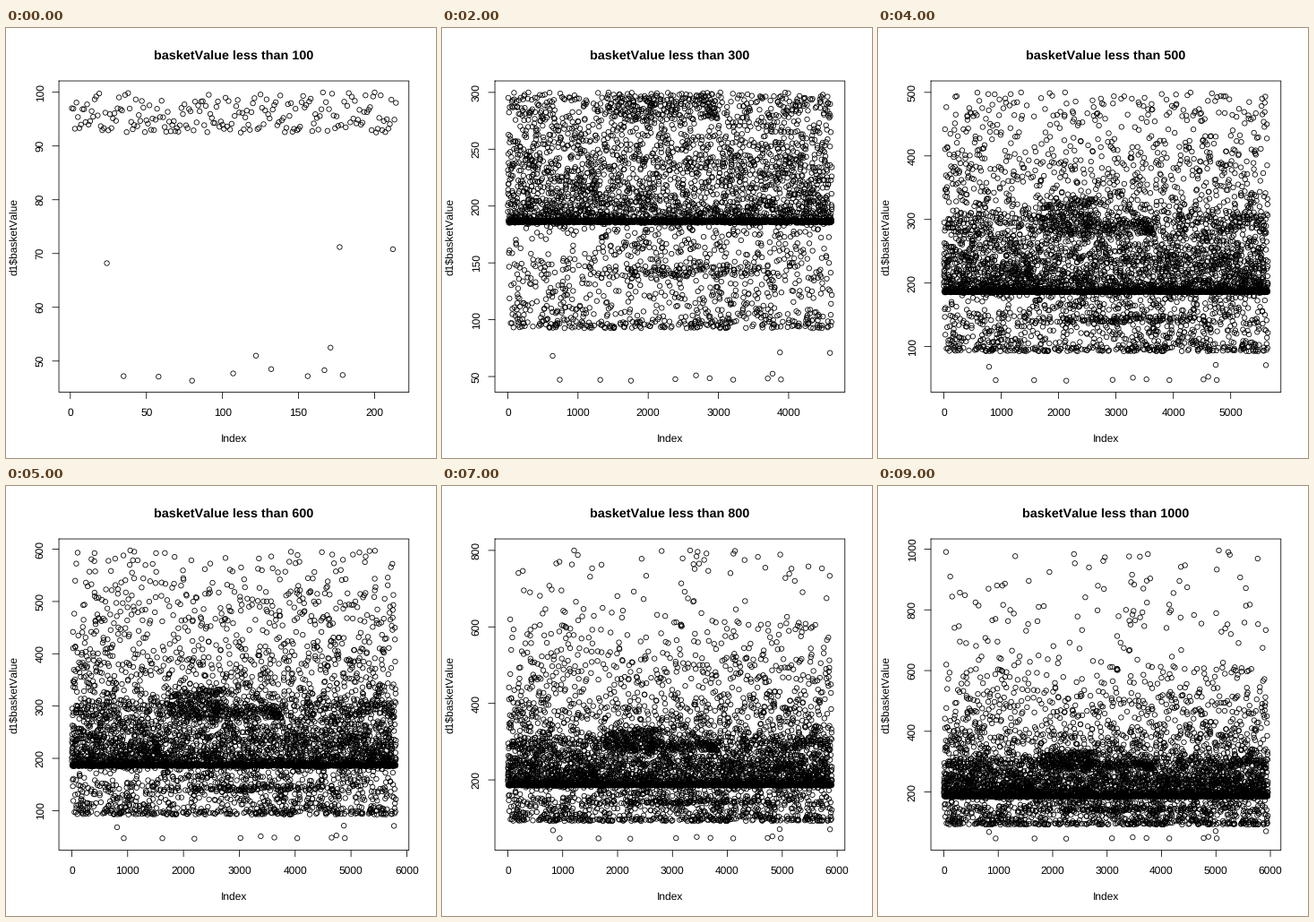
Write a matplotlib script that moves like this. It is 480 px wide and 480 px high and loops after 10000 ms.

```python
import math

import matplotlib.pyplot as plt
import numpy as np
from matplotlib.animation import FuncAnimation

SIZE, DPI = 480, 72
LEFT, RIGHT, TOP, BOTTOM = 59.04, 449.76, 59.04, 406.56
LINE = 14.4          # height of one margin line
PAD = 0.04 / 1.08    # share of the panel left free on each side
STROKE = 0.8

plt.rcParams["font.family"] = "Liberation Sans"
plt.rcParams["text.hinting"] = "none"
plt.rcParams["text.kerning_factor"] = 6
rng = np.random.default_rng(7)

# Lone low baskets: rank among values under 100, position under 300, value
LOW = np.array([
    (24, 644, 68.2), (35, 740, 47.2), (58, 1320, 47.1), (80, 1755, 46.35),
    (107, 2390, 47.7), (122, 2683, 51.0), (132, 2876, 48.5),
    (156, 3204, 47.2), (167, 3708, 48.3), (171, 3775, 52.5),
    (177, 3880, 71.2), (179, 3893, 47.4), (212, 4590, 70.8)])
COUNT_100, COUNT_300 = 214, 4617


def band(count, lo, hi, power=1.0, start=0.0, end=1.0):
    """Random baskets: a power above 1 crowds them towards lo."""
    pos = rng.uniform(start, end, count)
    return np.column_stack([pos, lo + (hi - lo) * rng.random(count) ** power])


def low_bands(places):
    """Baskets under 100: scattered between the lone ones, keeping ranks."""
    ranks = np.r_[0, LOW[:, 0], COUNT_100 + 1].astype(int)
    edges = np.quantile(places, np.r_[0, LOW[:, 1] / COUNT_300, 1])
    gaps = [band(n - 1, 92.5, 99.97, 1.2, a, b)
            for n, a, b in zip(np.diff(ranks), edges, edges[1:])]
    return np.vstack([np.column_stack([edges[1:-1], LOW[:, 2]])] + gaps)


def make_data():
    data = np.vstack([
        band(660, 100, 185, 1.1),
        band(80, 138, 147, 1.2, 0.33, 0.80),
        band(60, 138, 170, 1.2, 0.30, 0.65),
        band(700, 185.2, 187.5),
        band(2743, 186, 300, 2.0),
        band(160, 276, 300, 1, 0.32, 0.64),
        band(645, 300, 400, 1.5),
        band(105, 300, 332, 1.2, 0.32, 0.46),
        band(262, 400, 500, 1.25),
        band(20, 462, 468),
        band(156, 500, 600, 1.3),
        band(150, 600, 1000, 1.6),
    ])
    data = np.vstack([data, low_bands(data[data[:, 1] < 300, 0])])
    return data[np.argsort(data[:, 0]), 1]


VALUES = make_data()


def tick_step(span):
    cell = span * 1.08 / 5
    base = 10 ** math.floor(math.log10(cell))
    unit = base
    for mult, bias in ((2, 0.8), (5, 1.7), (10, 0.8)):
        if mult * base - cell < bias * (cell - unit):
            unit = mult * base
    return unit


def ticks(lo, hi):
    step, extra = tick_step(hi - lo), 0.04 * (hi - lo)
    first = math.ceil((lo - extra) / step)
    last = math.floor((hi + extra) / step)
    return [k * step for k in range(first, last + 1)]


def scale(v, lo, hi, a, b):
    """Map lo..hi into the padded panel side running from a to b."""
    return a + (b - a) * (PAD + (1 - 2 * PAD) * (v - lo) / (hi - lo))


fig = plt.figure(figsize=(SIZE / DPI, SIZE / DPI), dpi=DPI, facecolor="white")
ax = fig.add_axes([0, 0, 1, 1])


def stroke(xs, ys):
    ax.plot(xs, ys, color="black", lw=STROKE, snap=False,
            solid_capstyle="round")


def label(x, y, text, size=12, rotation=0, weight="normal"):
    ax.text(x, y, text, size=size, rotation=rotation, weight=weight,
            ha="center", va="baseline", rotation_mode="anchor")


def draw(i):
    limit = 100 * (i + 1)
    shown = VALUES[VALUES < limit]
    count, lo, hi = shown.size, shown.min(), shown.max()

    def to_x(v):
        return scale(v, 1, count, LEFT, RIGHT)

    def to_y(v):
        return scale(v, lo, hi, BOTTOM, TOP)

    ax.clear()
    ax.set(xlim=(0, SIZE), ylim=(SIZE, 0))
    ax.axis("off")

    ax.scatter(to_x(np.arange(1, count + 1)), to_y(shown), s=5.4 ** 2,
               facecolors="none", edgecolors="black", linewidths=STROKE)
    stroke([LEFT, RIGHT, RIGHT, LEFT, LEFT], [TOP, TOP, BOTTOM, BOTTOM, TOP])

    for v in ticks(1, count):
        x = to_x(v)
        stroke([x, x], [BOTTOM, BOTTOM + LINE / 2])
        label(x, BOTTOM + 1.85 * LINE, str(v))
    for v in ticks(lo, hi):
        y = to_y(v)
        stroke([LEFT - LINE / 2, LEFT], [y, y])
        label(LEFT - 1.2 * LINE, y, str(v), rotation=90)

    mid_x, mid_y = (LEFT + RIGHT) / 2, (TOP + BOTTOM) / 2
    label(mid_x, 34.8, f"basketValue less than {limit}", 14.4, weight="bold")
    label(mid_x, BOTTOM + 3.85 * LINE, "Index")
    label(LEFT - 3.2 * LINE, mid_y, "d1$basketValue", rotation=90)


anim = FuncAnimation(fig, draw, frames=10, interval=1000, repeat=True,
                     repeat_delay=0, init_func=lambda: None)
plt.show()
```
